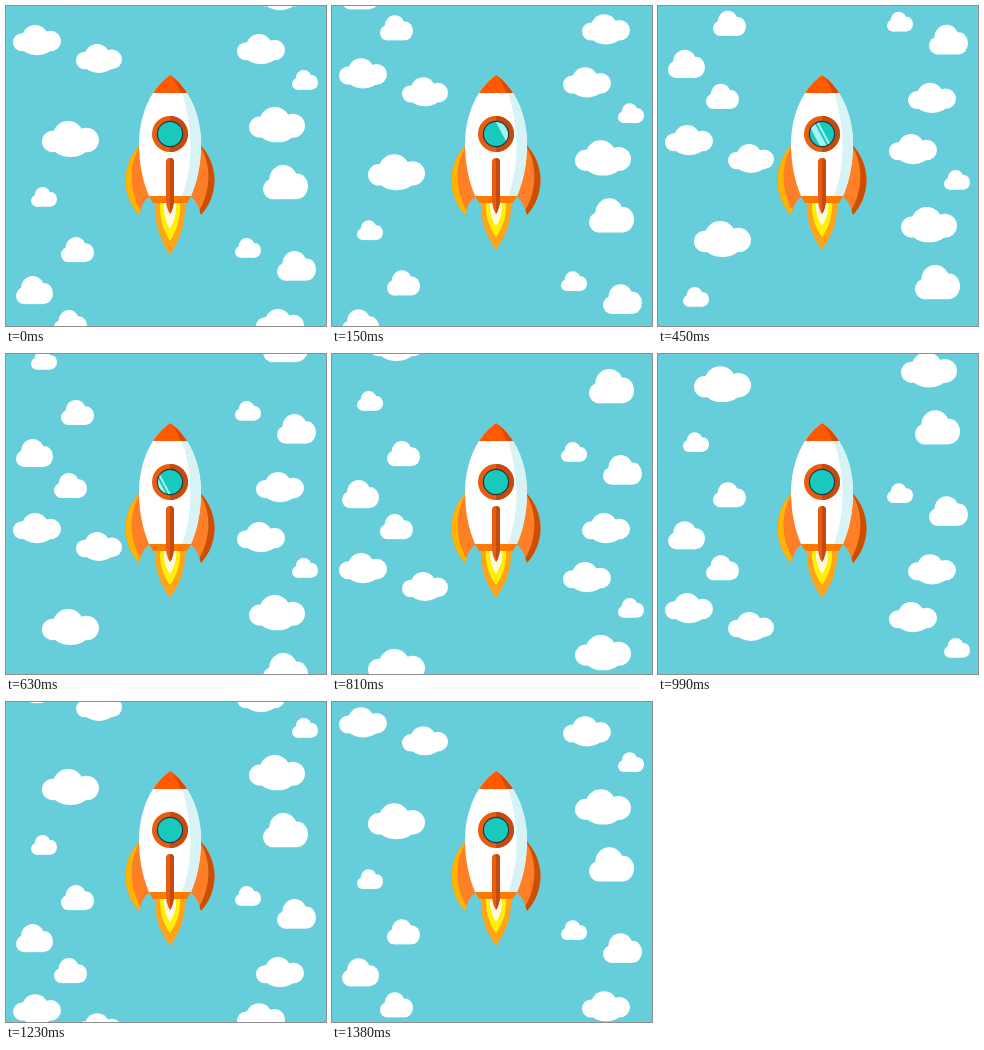
An HTML page that plays this animation: 320 by 320 pixels, repeating every 1.44 s.

```html
<!DOCTYPE html>
<html lang="en">
<head>
<meta charset="utf-8">
<title>Rocket in the clouds</title>
<style>
  html, body { margin: 0; width: 100%; height: 100%; overflow: hidden; background: #66cedb; }
  svg { display: block; width: 100vw; height: 100vh; }
</style>
</head>
<body>
<svg viewBox="0 0 320 320">
  <defs>
    <!-- unit clouds, scaled to their boxes -->
    <g id="wide">
      <ellipse cx=".19" cy=".57" rx=".19" ry=".3"/>
      <ellipse cx=".46" cy=".42" rx=".27" ry=".42"/>
      <ellipse cx=".78" cy=".53" rx=".22" ry=".34"/>
      <ellipse cx=".5" cy=".72" rx=".31" ry=".28"/>
    </g>
    <g id="round">
      <ellipse cx=".22" cy=".7" rx=".22" ry=".3"/>
      <ellipse cx=".45" cy=".43" rx=".31" ry=".43"/>
      <ellipse cx=".76" cy=".62" rx=".24" ry=".37"/>
      <rect x=".22" y=".6" width=".54" height=".4"/>
    </g>
    <g id="sky" fill="#fff"></g>
    <path id="hull" d="M164 69C182 81 195 108 195 138C195 158 191 176 185 190H143C137 176 133 158 133 138C133 108 146 81 164 69Z"/>
    <path id="fin" d="M193 138C203 147 208.5 161 208.5 174C208.5 188 203 200 195 209C193 201 190 194 184 190C189 174 192 158 193 138Z"/>
    <path id="edge" d="M193 138C203 147 208.5 161 208.5 174C208.5 188 203 200 195 209L193.5 204C205 184 206 158 193 138Z"/>
    <clipPath id="inHull"><use href="#hull"/></clipPath>
    <clipPath id="inGlass"><circle cx="164" cy="128" r="12"/></clipPath>
  </defs>

  <use id="outgoing" href="#sky"/>
  <use id="incoming" href="#sky"/>

  <g id="flame">
    <path d="M149 192C148 210 151 226 164 244C177 226 180 210 179 192Z" fill="#ffa31a"/>
    <path d="M154 192C153 208 156 220 164 231C172 220 175 208 174 192Z" fill="#fff000"/>
    <path d="M158 192C157 204 159 213 164 220C169 213 171 204 170 192Z" fill="#fff8dc"/>
  </g>

  <g transform="translate(328 0) scale(-1 1)">
    <use href="#fin" fill="#ff7f27"/>
    <use href="#edge" fill="#ffb400"/>
  </g>
  <use href="#fin" fill="#ff7f27"/>
  <use href="#edge" fill="#cc4e00"/>
  <path d="M143 190H185L181 197H147Z" fill="#ff7a00"/>

  <use href="#hull" fill="#fff"/>
  <g clip-path="url(#inHull)">
    <path d="M174 80C186 115 189 155 176 190H200V80Z" fill="#d8f3f6"/>
    <path d="M130 60H200V87H130Z" fill="#ff5a00"/>
    <path d="M164 69Q172 77 174 87H200V69Z" fill="#d94a00"/>
  </g>

  <circle cx="164" cy="128" r="18" fill="#e85d10"/>
  <path d="M164 110A18 18 0 0 1 164 146Z" fill="#c44a10"/>
  <circle cx="164" cy="128" r="13.2" fill="#1f3a44"/>
  <circle cx="164" cy="128" r="12" fill="#19c9be"/>
  <g clip-path="url(#inGlass)">
    <g transform="translate(164 128) rotate(-28)">
      <g id="glint" fill="#a5f3f0">
        <rect x="-4" y="-16" width="6" height="32"/>
        <rect x="4" y="-16" width="2" height="32"/>
      </g>
    </g>
  </g>
  <path d="M160 156A4 4 0 0 1 168 156V193Q168 202 164 208Q160 202 160 193Z" fill="#e85d10"/>
  <path d="M164 152A4 4 0 0 1 168 156V193Q168 202 164 208Z" fill="#c44a10"/>
</svg>
<script>
const LOOP = 1440, STEP = 30, STEPS = LOOP / STEP;
const $ = id => document.getElementById(id);
const move = (id, x, y) => $(id).setAttribute("transform", `translate(${x} ${y})`);

// left, top and width; each kind keeps its own proportions
const kinds = {
  wide: { ratio: 0.63, at: [[7, 19, 48], [70, 38, 46], [36, 115, 57], [231, 28, 48], [243, 101, 56], [250, 303, 48]] },
  round: { ratio: 0.76, at: [[25, 181, 26], [55, 231, 33], [10, 270, 37], [48, 304, 33],
    [286, 64, 26], [257, 159, 45], [229, 232, 26], [271, 245, 39]] }
};

for (const [kind, { ratio, at }] of Object.entries(kinds))
  for (const [x, y, w] of at)
    $("sky").innerHTML += `<use href="#${kind}" transform="translate(${x} ${y}) scale(${w} ${w * ratio})"/>`;

function draw(now) {
  // the last pose is held for two steps
  const step = Math.min(Math.floor(now % LOOP / STEP), STEPS - 2);
  const p = step / STEPS;
  move("outgoing", 0, 320 * p);
  move("incoming", 0, 329 * (p - 1));
  move("glint", 16 - 62 * p, 0);
  const stretch = 1 + 0.1 * Math.max(0, 1 - step / 4);
  $("flame").setAttribute("transform", `translate(0 192) scale(1 ${stretch}) translate(0 -192)`);
}

const start = performance.now();
function tick() {
  draw(performance.now() - start);
  requestAnimationFrame(tick);
}
tick();
</script>
</body>
</html>
```
